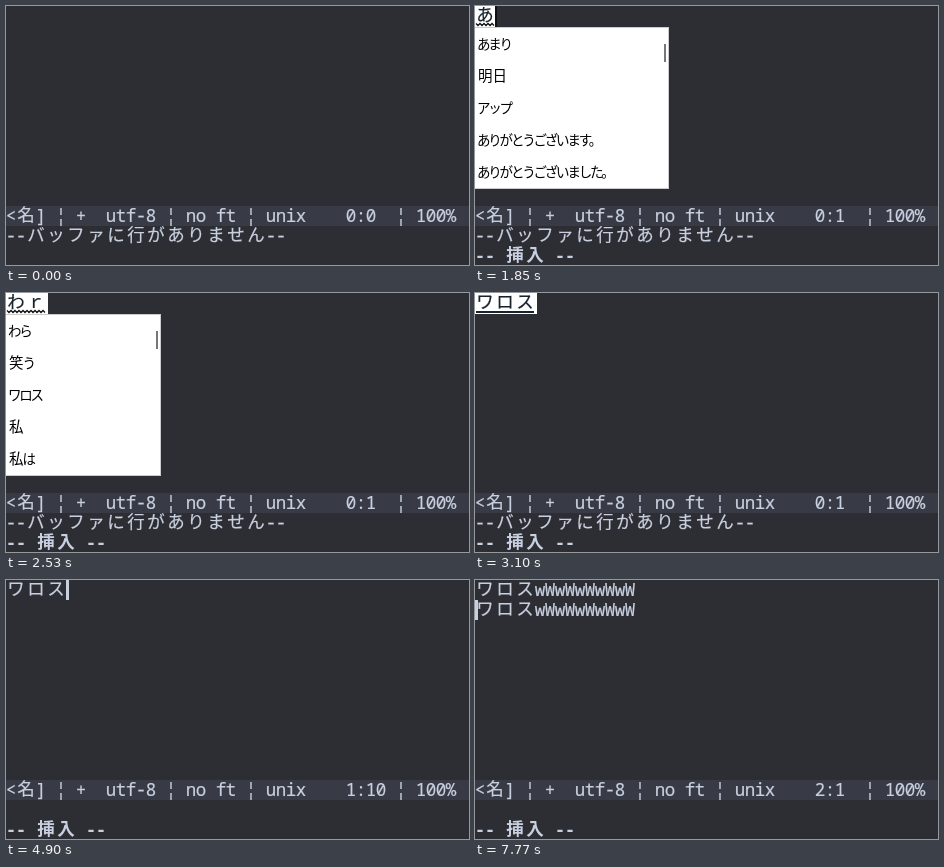
An HTML page that plays this animation: 463 by 259 pixels, repeating every 7990 ms.

```html
<!DOCTYPE html>
<html lang="ja">
<head>
<meta charset="utf-8">
<title>Editor input</title>
<style>
html, body { margin: 0; width: 100%; height: 100%; overflow: hidden; background: #2d2e33; }
#stage {
  position: relative; width: 463px; height: 259px; overflow: hidden;
  background: #2d2e33; color: #c8d0e0;
  font-family: "Noto Sans Mono", "DejaVu Sans Mono", monospace;
}
#stage > * { position: absolute; }
.row { left: 0; width: 463px; height: 20px; white-space: nowrap; font-size: 0; font-weight: 500; }
.row i {
  display: inline-block; vertical-align: top; width: 10px; height: 20px;
  font-style: normal; font-size: 17.5px; line-height: 18px; text-indent: -.25px; white-space: pre;
  -webkit-text-stroke: .2px currentColor;
}
.row i.wide {
  width: 20px; text-align: center; text-indent: 0; font-size: 17.5px; line-height: 15px;
  font-family: "Noto Sans CJK JP", "Noto Sans CJK", sans-serif;
}
#line2 { top: 20px; }
#status { top: 200px; background: #383a45; }
#message { top: 220px; }
#mode { top: 240px; font-weight: 700; }
#mode i { -webkit-text-stroke: 0; }
#cmd { top: 240px; left: 360px; width: 10px; }
#cursor { background: #c8d0e0; color: #2d2e33; overflow: hidden; }
#comp { top: 0; height: 21px; background: #fff; color: #16222e; }
#wave { top: 0; left: 0; fill: none; stroke: #111; stroke-width: 1.3; }
#rule { top: 18px; left: 1px; height: 2px; background: #16222e; }
#caret { top: 0; width: 2px; height: 21px; background: #111; }
#popup {
  left: -1px; top: 21px; height: 160px; background: #fff; color: #000;
  border: 1px solid #ccc;
  font: 14.5px/29px "Noto Sans CJK JP", "Noto Sans CJK", sans-serif;
}
#popup div { height: 32px; padding-left: 3px; white-space: nowrap; }
#popup .kana { font-size: 13.5px; letter-spacing: -2.2px; margin-left: -1px; }
#popup::after {
  content: ""; position: absolute; right: 2px; top: 16px;
  width: 2px; height: 18px; background: #777;
}
</style>
</head>
<body>
<div id="stage">
  <div id="line1" class="row"></div>
  <div id="line2" class="row"></div>
  <div id="status" class="row"></div>
  <div id="message" class="row"></div>
  <div id="mode" class="row"></div>
  <div id="cmd" class="row"></div>
  <div id="cursor" class="row"></div>
  <div id="comp" class="row"></div>
  <svg id="wave" width="64" height="21"><path/></svg>
  <div id="rule"></div>
  <div id="caret"></div>
  <div id="popup"></div>
</div>
<script>
const LOOP = 7990;
const el = {};
document.querySelectorAll('#stage > *').forEach(e => el[e.id] = e);

const INSERT = '-- 挿入 --';
const WORD = 'ワロス';
const LAUGH = WORD + 'wW'.repeat(5);
const LISTS = {
  a: { width: 193, items: ['あまり', '明日', 'アップ', 'ありがとうございます。', 'ありがとうございました。'] },
  wa: { width: 154, items: ['わら', '笑う', 'ワロス', '私', '私は'] }
};

// Cursor: [x, y, width, character under it]
const bar = (x, y = 0) => [x, y, 3, ''];
const block = (x, y, char) => [x, y, char > '\u2e80' ? 20 : 10, char];

// Each step changes only the listed parts of the state.
const STEPS = [
  [0, { line1: '', line2: '', pos: '0:0', message: '--バッファに行がありません--', mode: '', cmd: '',
        cursor: null, comp: '', fixed: false, caret: false, list: null }],
  [230, { cursor: block(0, 0, ' ') }],
  [480, { cursor: bar(0), mode: INSERT, pos: '0:1' }],
  [1160, { cursor: null }],
  [1340, { comp: 'あ' }],
  [1410, { list: 'a' }],
  [1850, { caret: true }],
  [2020, { list: null, caret: false }],
  [2080, { comp: '', cursor: bar(0) }],
  [2320, { comp: 'ｗ', cursor: null }],
  [2390, { comp: 'わ' }],
  [2460, { list: 'wa' }],
  [2530, { comp: 'わｒ' }],
  [2630, { comp: 'わろ' }],
  [2820, { comp: 'わろｓ' }],
  [2980, { comp: 'わろす' }],
  [3100, { comp: WORD, fixed: true, list: null }],
  [3220, { comp: '', fixed: false, line1: WORD, pos: '1:10', cursor: bar(60) }],
  [3900, { cursor: null }],
  [4090, { cursor: block(40, 0, 'ス'), mode: '', message: '', pos: '1:7' }],
  [4660, { cmd: '5' }],
  [4900, { cmd: '', cursor: bar(60), mode: INSERT, pos: '1:10' }],
  [5640, { cursor: null }],
  [5700, { line1: WORD + 'w', cursor: bar(70), pos: '1:11' }],
  [5940, { line1: WORD + 'wW', cursor: bar(80), pos: '1:12' }],
  [6280, { line1: LAUGH, cursor: block(150, 0, 'W'), mode: '', pos: '1:19' }],
  [6980, { cursor: null }],
  [7040, { cmd: 'y' }],
  [7230, { cmd: '', cursor: block(150, 0, 'W') }],
  [7470, { line2: LAUGH, cursor: block(0, 20, 'ワ'), pos: '2:1' }],
  [7770, { cursor: bar(0, 20), mode: INSERT }]
];

const escape = c => c === '<' ? '&lt;' : c;
const cells = text => [...text].map(c =>
  `<i${c > '\u2e80' ? ' class="wide"' : ''}>${escape(c)}</i>`).join('');
const show = (e, on) => { e.style.display = on ? 'block' : 'none'; };
const statusText = pos => `<名] ¦ +  utf-8 ¦ no ft ¦ unix    ${pos.padEnd(4)} ¦ 100%`;

function wavePath(width) {
  let d = 'M1 17.5';
  for (let x = 3, down = true; x < width; x += 2, down = !down) d += `L${x} ${down ? 19.5 : 17.5}`;
  return d;
}

function drawCursor(cursor) {
  show(el.cursor, cursor);
  if (!cursor) return;
  const [x, y, width, char] = cursor;
  Object.assign(el.cursor.style, { left: x + 'px', top: y + 'px', width: width + 'px' });
  el.cursor.innerHTML = cells(char);
}

function drawComposition({ comp, fixed, caret }) {
  const width = comp.length * 20;
  show(el.comp, comp);
  show(el.wave, comp && !fixed);
  show(el.rule, comp && fixed);
  show(el.caret, caret);
  el.comp.innerHTML = cells(comp);
  el.comp.style.width = width + 2 + 'px';
  el.rule.style.width = width - 2 + 'px';
  el.caret.style.left = width + 'px';
  el.wave.firstElementChild.setAttribute('d', wavePath(width));
}

function drawPopup(name) {
  show(el.popup, name);
  if (!name) return;
  const { width, items } = LISTS[name];
  el.popup.style.width = width + 'px';
  el.popup.innerHTML = items.map(text =>
    `<div>${text.replace(/[\u3001-\u30ff]+/g, '<span class="kana">$&</span>')}</div>`).join('');
}

function render(state) {
  for (const id of ['line1', 'line2', 'message', 'mode', 'cmd']) el[id].innerHTML = cells(state[id]);
  el.status.innerHTML = cells(statusText(state.pos));
  drawCursor(state.cursor);
  drawComposition(state);
  drawPopup(state.list);
}

let shown = -1;
const start = performance.now();
function tick() {
  const t = Math.max(0, performance.now() - start) % LOOP;
  const past = STEPS.filter(([at]) => at <= t);
  if (past.length !== shown) {
    shown = past.length;
    render(Object.assign({}, ...past.map(([, change]) => change)));
  }
  requestAnimationFrame(tick);
}
tick();
</script>
</body>
</html>
```
